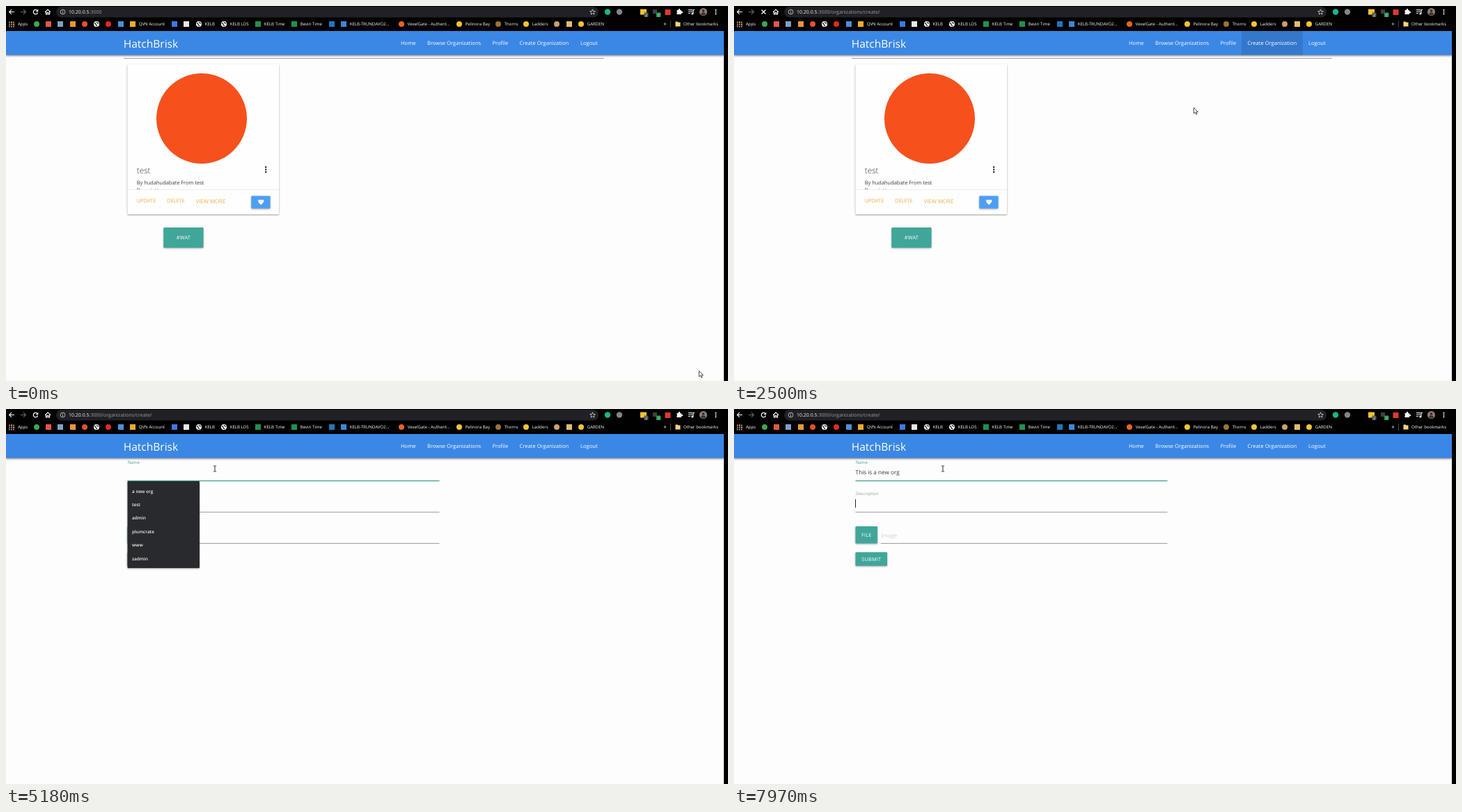
Recreate the animation shown at these times as an HTML page with a canvas. Size 1037x540 px, loop 8000 ms.

```html
<!DOCTYPE html>
<html lang="en">
<head>
<meta charset="utf-8">
<style>
html, body { margin: 0; width: 100%; height: 100%; overflow: hidden; background: #000; }
canvas { display: block; }
</style>
</head>
<body>
<canvas id="stage" width="1037" height="540"></canvas>
<script>
const ctx = document.getElementById('stage').getContext('2d');
const LOOP = 8000, STEP = 78.4;
const TEAL = '#40a699', GREY = '#9e9e9e', INK = '#3a3a3a';
const HOST = '10.20.0.5', PORT = ':3000', PATH = '/organizations/create/';

// ---------- helpers ----------
const clamp = v => Math.max(0, Math.min(1, v));
const easeOut = v => 1 - (1 - clamp(v)) ** 2;

function text(str, x, y, size, color, weight = 400, align = 'left') {
  ctx.font = `${weight} ${size}px "Open Sans", "Noto Sans", sans-serif`;
  ctx.textAlign = align;
  ctx.fillStyle = color;
  ctx.fillText(str, x, y);
  return ctx.measureText(str).width;
}
function rect(x, y, w, h, color) {
  ctx.fillStyle = color;
  ctx.fillRect(x, y, w, h);
}
function round(x, y, w, h, r, color) {
  ctx.fillStyle = color;
  ctx.beginPath();
  ctx.roundRect(x, y, w, h, r);
  ctx.fill();
}
function circle(x, y, r, color) {
  ctx.fillStyle = color;
  ctx.beginPath();
  ctx.arc(x, y, r, 0, 7);
  ctx.fill();
}
function path(d, x, y, stroke, fill, width = 1.1) {
  const p = new Path2D(d);
  ctx.save();
  ctx.translate(x, y);
  ctx.lineWidth = width;
  if (fill) { ctx.fillStyle = fill; ctx.fill(p); }
  if (stroke) { ctx.strokeStyle = stroke; ctx.stroke(p); }
  ctx.restore();
}
function raised(x, y, w, h, color) {
  ctx.save();
  ctx.shadowColor = 'rgba(0,0,0,.38)';
  ctx.shadowBlur = 2.5;
  ctx.shadowOffsetY = 1;
  round(x, y, w, h, 1, color);
  ctx.restore();
}
function button(x, y, w, h, label) {
  raised(x, y, w, h, TEAL);
  ctx.letterSpacing = '.25px';
  text(label, x + w / 2, y + h / 2 + 2.7, 7.3, '#fff', 500, 'center');
  ctx.letterSpacing = '0px';
}

// ---------- browser ----------
// x, icon colour, shape, label
const bookmarks = [
  [44, '#3aa757', 'circle'], [61, '#e0584c', 'square'], [78, '#7f9fc8', 'square'],
  [96, '#f0962e', 'square'], [113, '#e8502c', 'circle'], [130, '#fff', 'globe'],
  [147, '#e02b20', 'circle'], [165, '#4a8fd8', 'square'], [182, '#f0ac28', 'square', 'QVN Account'],
  [242, '#3b78e7', 'square'], [259, '#e6e6e6', 'square'], [277, '#fff', 'globe', 'KELB'],
  [313, '#fff', 'globe', 'KELB LDS'], [362, '#1f9150', 'square', 'KELB Time'],
  [414, '#1f9150', 'square', 'Bevin Time'], [468, '#1d78c0', 'square'],
  [485, '#3d87d8', 'square', 'KELB-TRUNDAVO2...'], [568, '#e8641c', 'circle', 'VexelGate - Authent...'],
  [651, '#f7c331', 'circle', 'Pelinora Bay'], [707, '#9a7430', 'circle', 'Thorns'],
  [747, '#f7c331', 'circle', 'Ladders'], [791, '#c8a070', 'circle'],
  [809, '#e3bd6c', 'square'], [826, '#f7c331', 'circle', 'GARDEN']
];

function bookmarkIcon(x, color, shape) {
  if (shape === 'square') return rect(x - 4, 22, 8, 8, color);
  circle(x, 26, 4, color);
  if (shape === 'globe') path('M-3 -1.5Q-1 -1 -1 .3T1 3M0 -3Q1 -1 3 -1', x, 26, '#222', null, 1.3);
}

function drawBrowser(loading, navigated) {
  rect(0, 0, 1037, 36, '#010101');
  round(72, 1, 779, 15.5, 7.7, '#202124');
  path('M4 0H-3M0 -3.4L-3.4 0L0 3.4', 8, 8.5, '#fff');
  path('M-4 0H3M0 -3.4L3.4 0L0 3.4', 25, 8.5, '#6a6a6a');
  if (loading) path('M-3 -3L3 3M3 -3L-3 3', 42.5, 8.5, '#fff', null, 1.3);
  else {
    path('M2.6 -1.8A3.2 3.2 0 1 0 3.1 1', 42.5, 8.5, '#fff', null, 1.2);
    path('M3.7 -3.8V-.3H.2Z', 42.5, 8.5, null, '#fff');
  }
  path('M-4 .3L0 -3.5L4 .3M-2.6 -.6V3.4H-.9V1H.9V3.4H2.6V-.6', 60, 8.5, '#fff');
  path('M3.4 0A3.4 3.4 0 1 1 -3.4 0A3.4 3.4 0 1 1 3.4 0M0 -.4V2M0 -2V-1', 81.5, 8.5, '#ddd', null, .8);
  const w = text(HOST, 90, 11.2, 7, '#f0f0f0');
  text(PORT + (navigated ? PATH : ''), 90 + w, 11.2, 7, '#9aa0a6');
  path('M0 -3.8L1.1 -1.2L3.8 -1L1.7 .8L2.4 3.5L0 2L-2.4 3.5L-1.7 .8L-3.8 -1L-1.1 -1.2Z', 842.5, 8.6, '#ddd', null, .8);

  circle(864, 8.5, 4.2, '#17b78f');
  circle(881, 8.5, 4.2, '#858585');
  rect(911, 4.5, 9, 8, '#f4c430');
  round(916.5, 9.5, 6, 6.5, 1, '#555');
  text('2', 919.5, 14.7, 5, '#fff', 400, 'center');
  rect(929, 5, 6, 6, '#3c4043');
  round(934, 9.5, 6.5, 6.5, 1, '#2e9b57');
  text('1', 937.2, 14.7, 5, '#fff', 400, 'center');
  rect(946.5, 5, 8, 8, '#e0392c');
  path('M-3.5 -2H-1A1.3 1.3 0 1 1 1 -2H3V0A1.3 1.3 0 1 1 3 2V4H-3.5V2A1.3 1.3 0 0 0 -3.5 0Z', 967, 8, null, '#fff');
  path('M-4 -3H2M-4 -.5H2M-4 2H-1M3 2.5V-3H5', 984, 8.5, '#fff');
  circle(985.8, 11, 1.5, '#fff');
  circle(1001.5, 8.5, 5.5, '#8f8178');
  circle(1001.5, 7, 2, '#41302a');
  round(998.3, 9.5, 6.4, 3.7, 1.8, '#41302a');
  for (let i = -1; i < 2; i++) circle(1019.5, 8.5 + i * 2.8, .85, '#fff');

  const dots = ['#e8675b', '#efb93c', '#5aa865', '#5b92e5'];
  for (let i = 0; i < 9; i++)
    rect(4 + i % 3 * 3, 22.5 + Math.floor(i / 3) * 3, 2, 2, dots[i % 4]);
  text('Apps', 17, 28.2, 6.1, '#fff', 500);
  for (const [x, color, shape, label] of bookmarks) {
    bookmarkIcon(x, color, shape);
    if (label) text(label, x + 8.7, 28.2, 6.1, '#fff', 500);
  }
  text('»', 944.5, 28.2, 8, '#fff');
  rect(954, 21, 1, 10, '#444');
  path('M-3.5 -3.5H-.5L.5 -2.5H3.5V3.5H-3.5Z', 965, 26, null, '#f5d27a');
  text('Other bookmarks', 973, 28.2, 6.1, '#fff', 500);
}

// ---------- page ----------
const links = [['Home', 567], ['Browse Organizations', 605], ['Profile', 698.5],
  ['Create Organization', 737.5], ['Logout', 825]];

function drawNav(hover) {
  ctx.save();
  ctx.shadowColor = 'rgba(0,0,0,.45)';
  ctx.shadowBlur = 2.5;
  ctx.shadowOffsetY = 1;
  rect(0, 36, 1031, 34.5, '#3a87e5');
  ctx.restore();
  rect(729, 36, 88, 34.5, `rgba(0,0,0,${.11 * hover})`);
  text('HatchBrisk', 168.7, 60.2, 15.55, '#fff');
  for (const [label, x] of links) text(label, x, 56.4, 7.6, '#fff', 500);
}

function drawCard() {
  rect(169, 75, 690, 1, '#a2a2a2');
  raised(174.5, 84, 217.5, 216, '#fefefe');
  circle(281, 162, 65, '#f6511d');
  text('test', 187.7, 240.8, 11.8, INK, 300);
  for (let i = -1; i < 2; i++) circle(373.2, 235.5 + i * 3.5, 1.15, '#111');
  text('By hudahudabate From test', 187.7, 257.2, 7.45, INK);
  text('Description', 187.7, 268, 7.45, INK);
  rect(176, 264, 214, 14, '#fefefe');
  rect(174.5, 264, 217.5, 1, '#ececec');
  const orange = '#f5ab45';
  text('UPDATE', 187.7, 282.7, 7.45, orange);
  text('DELETE', 231, 282.7, 7.45, orange);
  text('VIEW MORE', 272.6, 283.6, 7.8, orange);
  raised(352.3, 273.5, 27.2, 18, '#4d9ff3');
  path('M0 3.8C-6 -.6 -4.2 -3.6 -2.2 -3.6Q-.7 -3.6 0 -2.3Q.7 -3.6 2.2 -3.6C4.2 -3.6 6 -.6 0 3.8Z', 366.2, 282.4, null, '#fff');
  button(226.3, 319, 57.2, 29, '#WAT');
}

function drawLabel(str, y, lift, color) {
  text(str, 174.7, y - 15.3 * lift, 7.65 - 1.5 * lift, color);
}
function caret(x, y) {
  rect(x, y, 1, 12, '#222');
}

const suggestions = ['a new org', 'test', 'admin', 'plumcrate', 'www', 'zadmin'];
// time and number of characters shown from then on
const keystrokes = [[5255, 1], [5330, 2], [5560, 4], [5790, 5], [6020, 6], [6100, 7], [6260, 9],
  [6410, 10], [6560, 11], [6640, 12], [6790, 13], [7020, 14], [7250, 15], [7330, 16], [7480, 17]];

function drawForm(t) {
  const focused = t >= 3600;
  const nameLift = easeOut((t - 3600) / 220);
  const descLift = easeOut((t - 7660) / 230);
  drawLabel('Name', 94.4, nameLift, focused ? '#4a9f92' : GREY);
  drawLabel('Description', 139.5, descLift, t > 7730 ? '#8fa5a2' : GREY);
  rect(174.5, 102.8, 448, focused ? 1.3 : 1, focused ? '#42a08c' : GREY);
  rect(174.5, 148, 448, 1, GREY);
  rect(211, 193, 411.5, 1, GREY);
  text('Image', 211.3, 184.5, 8, '#cdcdcd');
  button(174.5, 169, 31.5, 24.5, 'FILE');
  button(174.5, 206.2, 45.5, 19.6, 'SUBMIT');

  const count = keystrokes.reduce((n, [at, chars]) => t >= at ? chars : n, 0);
  const width = text('This is a new org'.slice(0, count), 174.6, 94.4, 8.2, INK);
  if (t >= 7730) caret(174, 130);
  else if (count || (t >= 3600 && t < 4000) || (t >= 4630 && t < 5180)) caret(174.2 + width, 85);

  if (t >= 3770 && t < 5255) {
    raised(174.5, 104, 103.5, 125, '#292a2d');
    suggestions.forEach((s, i) => text(s, 181, 120.6 + i * 19.4, 6.45, '#f1f1f1', 600));
  }
}

// ---------- pointer ----------
const route = [[0, 995, 525], [230, 895, 350], [470, 701, 23], [620, 714, 36], [850, 764, 55.5], [1025, 764, 56.5],
  [2050, 764, 56.5], [2250, 715, 100], [2440, 660, 146], [2920, 660, 146], [3060, 540, 104],
  [3140, 430, 78], [3295, 249, 92], [3640, 249, 92], [3900, 292, 87], [4070, 300, 86]];

function pointerAt(t) {
  const i = route.findIndex(([at]) => at > t);
  if (i === 0) return route[0].slice(1);
  if (i < 0) return route.at(-1).slice(1);
  const [t0, x0, y0] = route[i - 1], [t1, x1, y1] = route[i];
  const k = (t - t0) / (t1 - t0);
  return [x0 + (x1 - x0) * k, y0 + (y1 - y0) * k];
}

function drawPointer(t, onForm) {
  const [x, y] = pointerAt(70 + Math.floor((t - 65) / STEP) * STEP);
  if (t >= 1880 && t < 2040) circle(764, 57, 6.3, 'rgba(214,222,40,.75)');
  if (t >= 3450 && t < 3620) circle(248, 92, 6.3, 'rgba(252,244,60,.9)');
  if (onForm && y > 79 && y < 104 && x < 622)
    path('M-2 -4H-.4L0 -3.6L.4 -4H2M0 -3.6V3.6M-2 4H-.4L0 3.6L.4 4H2', x, y, '#333', null, 1);
  else if (x > 729 && x < 817 && y > 37 && y < 70)
    path('M-1 .5Q0 -.8 1 .5V4L4.6 5Q5.4 5.4 5.2 6.6L4.4 10.3H-.6L-3 6.4Q-3.2 5 -2 5.4L-1 6.4Z', x, y, '#222', '#fff', .8);
  else
    path('M0 0V8.6L2 6.8L3.4 9.8L4.7 9.2L3.4 6.3H6Z', x + .4, y + .3, '#222', '#fff', .8);
}

function drawStatus(t) {
  ctx.globalAlpha = clamp((t - 1100) / 150);
  round(-2, 530.3, 109, 12, 2, '#111214');
  text(HOST + PORT + PATH, 0, 538, 6, '#dedede');
  ctx.globalAlpha = 1;
}

function draw(t) {
  const onForm = t >= 2590;
  rect(0, 0, 1037, 540, '#fdfdfd');
  if (onForm) drawForm(t); else drawCard();
  drawNav(onForm ? 0 : clamp((t - 640) / 220));
  drawBrowser(t >= 1970 && t < 2830, t >= 2200);
  rect(1031, 0, 6, 540, '#000');
  for (let i = -1; i < 2; i++) circle(1019.5, 8.5 + i * 2.8, .85, '#fff');
  if (t >= 1180 && t < 2200) drawStatus(t);
  drawPointer(t, onForm);
}

ctx.textRendering = 'geometricPrecision';
const start = performance.now();
function tick() {
  draw((performance.now() - start) % LOOP);
  requestAnimationFrame(tick);
}
tick();
</script>
</body>
</html>
```
